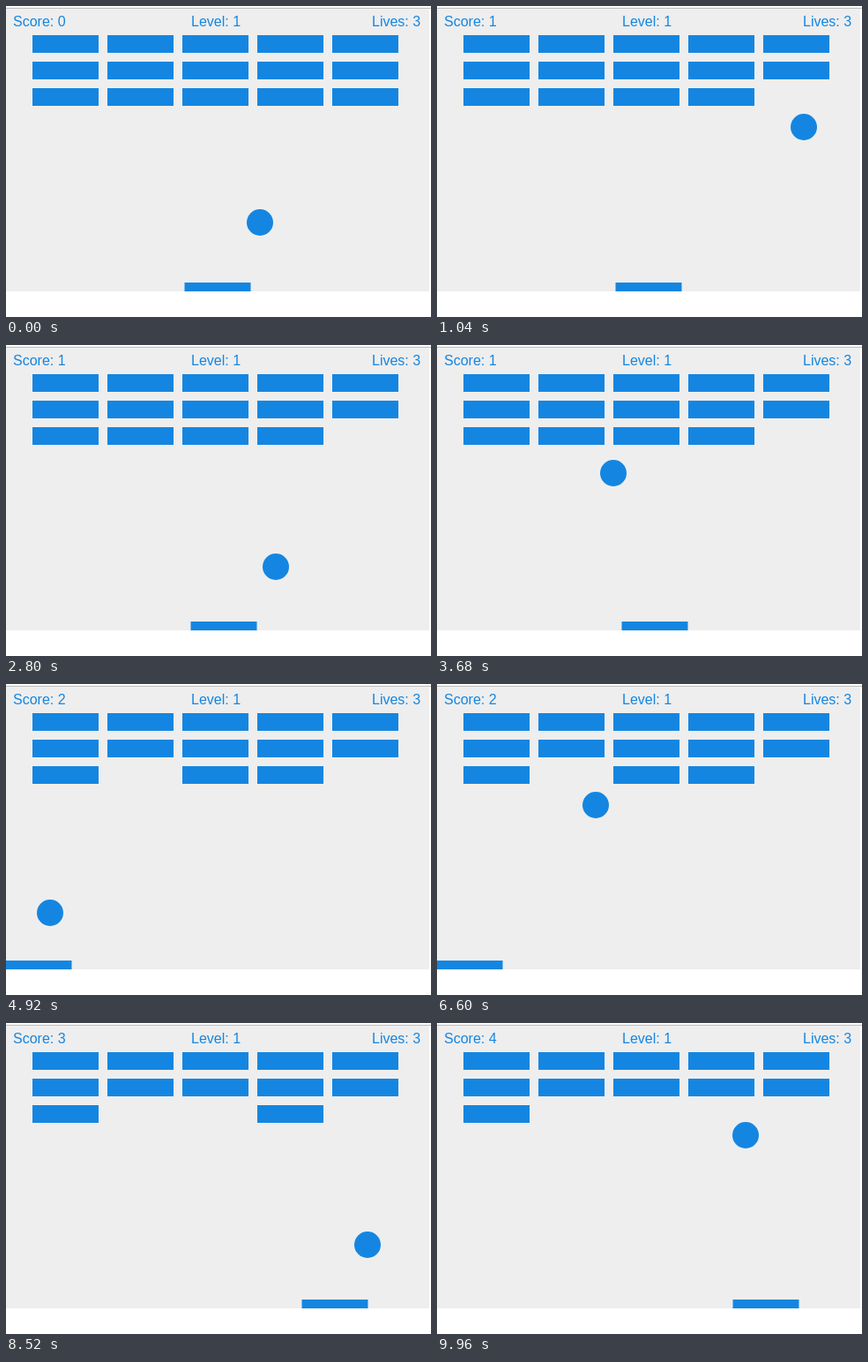
An HTML page with a canvas that plays this animation: 482 px wide and 352 px high, repeating every 10000 ms.

```html
<!DOCTYPE html>
<html lang="en">
<head>
<meta charset="utf-8">
<title>Breakout</title>
<style>
  html, body { margin: 0; width: 100%; height: 100%; overflow: hidden; background: #fff; }
  canvas { display: block; }
</style>
</head>
<body>
<canvas id="stage" width="482" height="352"></canvas>
<script>
const ctx = document.getElementById('stage').getContext('2d');
const BLUE = '#1486e1';
const LOOP = 10000, TICK = 40;
const RADIUS = 15, BRICK_W = 75, BRICK_H = 20;
const LEFT = 14, RIGHT = 466, FLOOR = 299;

// Arrow key presses, counted in game steps
const presses = [
  { from: 85, steps: 26, dir: 1 },
  { from: 136, steps: 25, dir: -1 },
  { from: 258, steps: 30, dir: -1 },
  { from: 417, steps: 48, dir: 1 }
];

function newGame() {
  const bricks = [];
  for (let row = 0; row < 3; row++) {
    for (let col = 0; col < 5; col++) bricks.push({ x: 30 + col * 85, y: 33 + row * 30 });
  }
  return { x: 288, y: 245, dx: 2, dy: -2, paddle: 202.5, score: 0, bricks };
}

function touches(ball, brick) {
  return ball.x > brick.x - RADIUS && ball.x < brick.x + BRICK_W + RADIUS &&
    ball.y > brick.y - RADIUS && ball.y < brick.y + BRICK_H + RADIUS;
}

function step(game, n) {
  game.x += game.dx;
  game.y += game.dy;
  if (game.x <= LEFT || game.x >= RIGHT) game.dx *= -1;
  if (game.y >= FLOOR) game.dy *= -1;

  const hit = game.bricks.findIndex(brick => touches(game, brick));
  if (hit >= 0) {
    game.bricks.splice(hit, 1);
    game.dy *= -1;
    game.score++;
  }

  const press = presses.find(({ from, steps }) => n >= from && n < from + steps);
  if (press) game.paddle += 7 * press.dir;
}

// Replays the game from its start, at about 60 steps a second with a brisk first second
function gameAt(t) {
  const game = newGame();
  const count = Math.round(Math.min(0.0614 * t, 0.06005 * t + 1.3));
  for (let n = 0; n < count; n++) step(game, n);
  return game;
}

function rect(color, x, y, w, h) {
  ctx.fillStyle = color;
  ctx.fillRect(x, y, w, h);
}

function draw({ x, y, paddle, score, bricks }) {
  rect('#fff', 0, 0, 482, 352);
  rect('#bbb', 0, 2, 482, 1);
  rect('#eee', 0, 3, 480, 320);

  for (const brick of bricks) rect(BLUE, brick.x, brick.y, BRICK_W, BRICK_H);
  rect(BLUE, paddle, 313, 75, 10);

  ctx.beginPath();
  ctx.arc(x, y, RADIUS, 0, 2 * Math.PI);
  ctx.fill();

  ctx.font = '16px "Liberation Sans", Arial, sans-serif';
  ctx.fillText('Score: ' + score, 8, 23);
  ctx.fillText('Level: 1', 210, 23);
  ctx.fillText('Lives: 3', 415, 23);
}

const begin = performance.now();
function frame() {
  const t = (performance.now() - begin) % LOOP;
  draw(gameAt(Math.floor(t / TICK) * TICK));
  requestAnimationFrame(frame);
}
frame();
</script>
</body>
</html>
```
